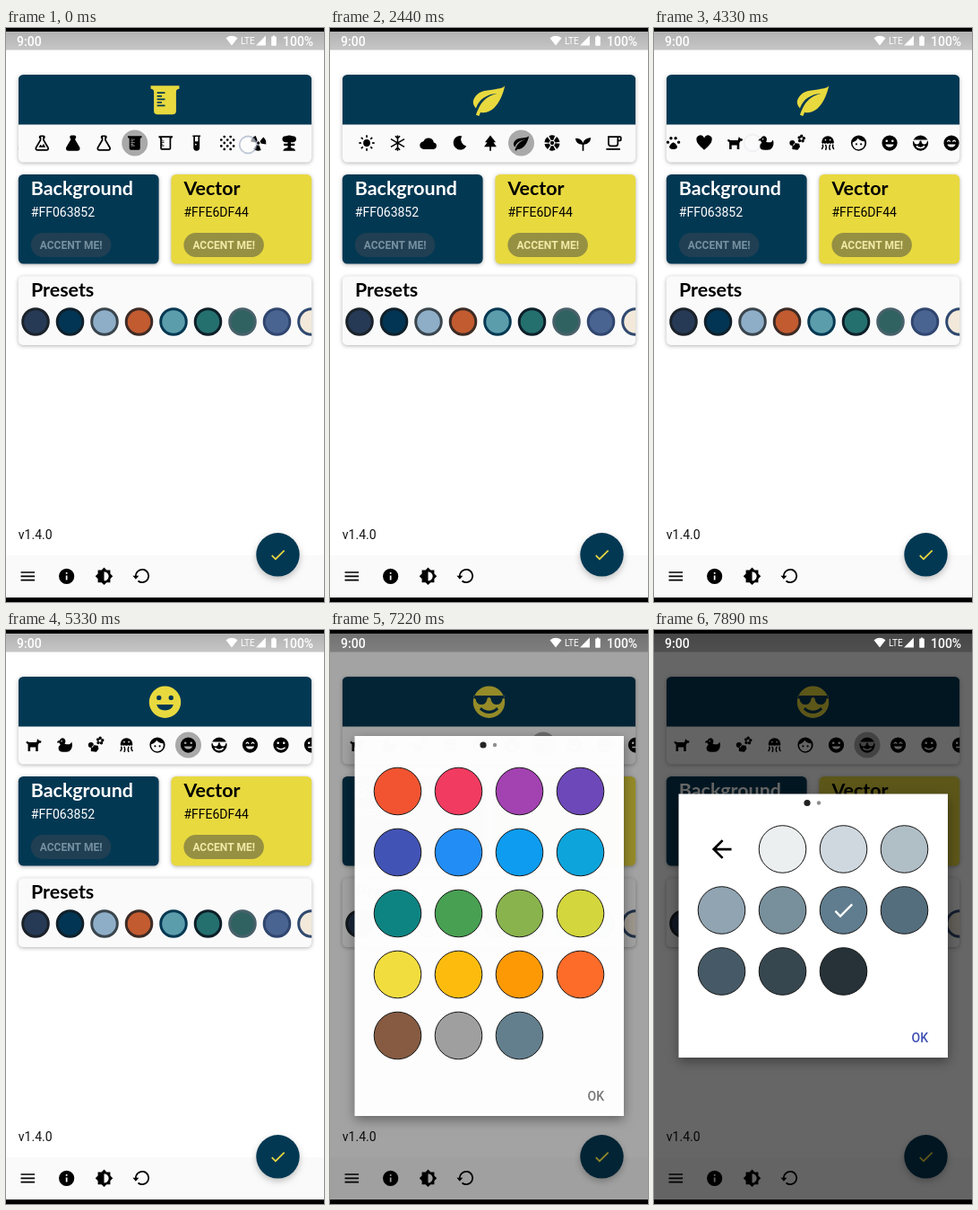
An HTML page with a canvas for the animation above (8 s loop, 355x639 px).

```html
<!DOCTYPE html>
<html lang="en">
<head>
<meta charset="utf-8">
<title>Icon editor</title>
<style>
html, body { margin: 0; width: 100%; height: 100%; overflow: hidden; background: #000; }
canvas { display: block; width: 355px; height: 639px; }
</style>
</head>
<body>
<canvas id="stage"></canvas>
<script>
const W = 355, H = 639, TOP = 4, BOTTOM = 634, LOOP = 8000;
const BLUE = '#033853', YELLOW = '#e8d93f';
const LEFT = 13.8, WIDE = 327.4, HALF = 156.8, ICON = 20.7;
const canvas = document.getElementById('stage');
const ctx = canvas.getContext('2d');
const dpr = window.devicePixelRatio || 1;
canvas.width = W * dpr;
canvas.height = H * dpr;

// Path helpers on a 24-unit grid
const disc = (x, y, r) => `M${x - r} ${y}a${r} ${r} 0 1 0 ${2 * r} 0a${r} ${r} 0 1 0 ${-2 * r} 0z`;
const dots = (r, ...p) => p.map(([x, y]) => disc(x, y, r)).join('');
const polar = (r, a) => `${12 + r * Math.cos(a)} ${12 + r * Math.sin(a)}`;
const fan = (n, r0, r1, half, turn) => Array.from({ length: n }, (_, i) => {
  const a = turn + i * 2 * Math.PI / n;
  return `M${polar(r0, a - half)}L${polar(r1, a - half)}A${r1} ${r1} 0 0 1 ${polar(r1, a + half)}L${polar(r0, a + half)}z`;
}).join('');
const icon = (fill, line, width = 2) => ({
  fill: fill && new Path2D(fill), line: line && new Path2D(line), width
});

const FACE = disc(12, 12, 10);
const EYES = dots(1.5, [8.2, 9.3], [15.8, 9.3]);
const FLASK = 'M6 22a3 3 0 0 1-3-3c0-.6.2-1.2.5-1.7L9 7.8V6a1 1 0 0 1-1-1V4a2 2 0 0 1 2-2h4a2 2 0 0 1 2 2v1a1 1 0 0 1-1 1v1.8l5.5 9.5c.3.5.5 1.1.5 1.7a3 3 0 0 1-3 3z';
const HOLLOW = 'M5 19a1 1 0 0 0 1 1h12a1 1 0 0 0 1-1c0-.2-.1-.4-.2-.6L13 8.4V4h-2v4.4L5.2 18.4c-.1.2-.2.4-.2.6z';
const BEAKER = 'M3 3h18v2a2 2 0 0 0-2 2v12a2 2 0 0 1-2 2H7a2 2 0 0 1-2-2V7a2 2 0 0 0-2-2z';
const CUP = 'M2 21h18v-2H2zM20 8h-2V5h2zM20 3H4v10a4 4 0 0 0 4 4h6a4 4 0 0 0 4-4v-3h2a2 2 0 0 0 2-2V5a2 2 0 0 0-2-2z';
const CUP_HOLE = 'M16 13a2 2 0 0 1-2 2H8a2 2 0 0 1-2-2V5h10z';
const GRIN = 'M6.7 13.6h10.6a5.5 5 0 0 1-10.6 0z';

const icons = {
  flaskLow: icon(FLASK + HOLLOW),
  flaskMark: icon(FLASK + HOLLOW + 'M8 17l2-3 2 2 2-3 2.5 4.5h-9z'),
  flask: icon(FLASK),
  flaskEmpty: icon(FLASK + HOLLOW),
  beaker: icon(BEAKER + [7, 9, 11, 13, 15].map((y, i) => `M7 ${y}h${i % 2 ? 3 : 5}v1H7z`).join('')),
  beakerEmpty: icon(BEAKER + 'M7 5v2h1v1H7v1h3v1H7v1h3v1H7v1h1v1H7v1h3v1H7v3h10V5z'),
  tube: icon('M7 2v2h1v14a4 4 0 0 0 8 0V4h1V2zM10 4h4v6h-4z' + disc(11, 14, 1)),
  grain: icon(dots(1.6, [8, 4], [16, 4], [4, 8], [12, 8], [20, 8], [8, 12], [16, 12], [4, 16], [12, 16], [20, 16], [8, 20], [16, 20])),
  radiation: icon(disc(12, 12, 2) + fan(3, 3.5, 10, .52, -.35)),
  blast: icon('M3 7q0-4 5-4 4-2 8 0 5 0 5 4t-5 4h-2v2h5v2.500h-5V18q5 .5 6 4H4q1-3.500 6-4v-2.500H5V13h5v-2H8q-5 0-5-4z'),
  bowl: icon('M4 8h16l2 3v3l-3 1q-1 5-5 5h-4q-6 0-6-7z'),
  yin: icon(FACE + 'M12 4a4 4 0 0 0 0 8 4 4 0 0 1 0 8 8 8 0 0 1 0-16z' + dots(1.5, [12, 8], [12, 16])),
  pi: icon('', 'M4 8V6h16M8.5 6v13M15.5 6v10q0 3 3.5 2', 2.2),
  alpha: icon('', 'M18 6q-3 12-8 12-4 0-4-6t4-6q5 0 8 12.5', 2.1),
  beta: icon('', 'M8 22V8q0-4 4-4t4 3.5-5 3.5q6 0 6 4t-5 4-4-3', 2.1),
  lambda: icon('', 'M6 5h2q2 0 3 3l4.5 10q.5 1 2.5 1M12 10.5L7 20', 2.1),
  sum: icon('', 'M17.5 8.5V5h-11l6.5 7-6.5 7h11v-3.5', 2.2),
  sigma: icon('', 'M20 5.200H12a6.800 7 0 1 0 0 14 6.800 7 0 0 0 3-13.300', 2.4),
  infinity: icon('', 'M12 12q-3-4-6-4a4 4 0 0 0 0 8q3 0 6-4t6-4a4 4 0 0 1 0 8q-3 0-6-4', 2.2),
  flash: icon('M7 2v11h3v9l7-12h-4l4-8z'),
  drop: icon('M12 3q7 8 6 12a6 6 0 0 1-12 0q-1-4 6-12z'),
  sun: icon(disc(12, 12, 4.5) + fan(8, 7, 10, .12, 0)),
  snow: icon('', 'M12 2v20M3.3 7l17.4 10M3.3 17L20.7 7M9 3l3 3 3-3M9 21l3-3 3 3', 1.8),
  cloud: icon('M6 20a5 5 0 0 1-.6-10 7 7 0 0 1 13.4 1.5A4.3 4.3 0 0 1 18.5 20z'),
  moon: icon('M15 3a9 9 0 1 0 6 13A9 9 0 0 1 15 3z'),
  tree: icon('M12 2l7 9h-3l4 6h-7v5h-2v-5H4l4-6H5z'),
  leaf: icon('M17 8C8 10 5.9 16.2 3.8 21.3L5.7 22l1-2.3c.4.2.9.3 1.3.3C19 20 22 3 22 3c-1 2-8 2.3-13 3.3S2 11.5 2 13.5s1.8 3.7 1.8 3.7C7 8 17 8 17 8z'),
  flower: icon(fan(6, 4, 10, .4, .5) + disc(12, 12, 2.5)),
  sprout: icon('M11 22v-8q-8 0-9-8 8 0 10 6 1-6 10-7 0 8-9 9v8z'),
  coffeeEmpty: icon(CUP + CUP_HOLE),
  tea: icon(CUP + 'M9 5h1v3l2 1v4H7.5V9L9 8z'),
  coffeeMark: icon(CUP + CUP_HOLE + 'M11 6.5q4 4 2 6-2 1.5-4 0-2-2 2-6z'),
  cupcake: icon('M12 1q2 2 1.5 3.5 4 0 4 4 3 .5 3 4h-17q0-3.5 3-4 0-4 4-4Q10 3 12 1zM6 14h2.5l.7 8H8zM10 14h4l-.5 8h-3zM15.5 14H18l-2 8h-1.2z'),
  pizza: icon('M12 2C8.4 2 5.2 3.5 3 6l9 16 9-16c-2.2-2.4-5.4-4-9-4z' + dots(1.8, [9, 7.5], [13, 13])),
  chef: icon('M12 1.5a4.4 4.4 0 0 0-4 2.6A4 4 0 0 0 6 12v5h12v-5a4 4 0 0 0-2-7.9A4.4 4.4 0 0 0 12 1.5zM6 18.5h12V22H6zM8.5 12h1v5h-1zM14.5 12h1v5h-1z'),
  burger: icon('M1 13q0-4 6.5-4t6.5 4zM1 15h13v2H1zM1 19h13v1q0 2-1 2H2q-1 0-1-2zM15 6h3V2l4-1 .3 1.3-2.8.7V6H23l-1.5 16H16z'),
  rice: icon('M2 12h20a10 10 0 0 1-5 8.5V22H7v-1.5A10 10 0 0 1 2 12zM5 11q1-6 7-6t7 6z', 'M13 7l7-5M15 9l7-5', 1.2),
  chili: icon('M8 2h2q0 3 2 4 2 2 2 5 2 4 6 3 3 1 1 4-2 3-7 3-9 0-9-10-2-5 2-6z'),
  bread: icon('M4 21q-4-4 2-10T17 3q5-1 5 3-1 5-8 11T4 21zM9 11l2 3 1-1-2-3zM13 8l2 3 1-1-2-3z'),
  egg: icon('M12 2q6 6 6 12a6 7 0 0 1-12 0q0-6 6-12z'),
  apple: icon('M12 7q4-3 7 0 3 4-1 11-2 4-6 2-4 2-6-2-4-7-1-11 3-3 7 0zM12 6q0-4 4-4 0 4-4 4z'),
  carrot: icon('M3 21L9 8q6-1 7 7zM14 8l1-5 2 4 4-2-1 4 2 1-5 1z'),
  fish: icon('M2 12q6-8 14-2l5-4v12l-5-4q-8 6-14-2z' + disc(7, 11, 1)),
  paw: icon('M12 11q3 1 5 5 1 4-5 4t-5-4q2-4 5-5z' + dots(2, [5, 11], [9, 6], [15, 6], [19, 11])),
  heart: icon('M12 21Q2 13 2 8a5 5 0 0 1 10-2 5 5 0 0 1 10 2q0 5-10 13z'),
  dog: icon('M17 4l-1.5 4.5H6L3 7 2 9l2.5 2V20h3v-5h7v5h3v-8l1.5-2.5H21l1-2.5-3.5-1z'),
  duck: icon('M9 3a4 4 0 0 1 4 4.5q0 2-1 3 3 1 6 .5 2-.5 3-3 2 6-1 10-2 3-6 3h-4q-6 0-6-5 0-2 2.5-4.5Q5 9.5 5 9H2q0-2 3.5-3Q6.5 3 9 3z' + disc(8, 7, .9)),
  bee: icon(disc(6, 12, 3.5) + 'M9 12l6 1 1 4-3 4-7-1 0-4z' + dots(2, [18, 3], [21, 6], [19.5, 9.5], [15.5, 9], [15, 5])),
  jelly: icon('M12 3a8 8 0 0 1 8 8q-1 3-3 1-1 2-3 0-2 2-4 0-2 2-3 0-2 2-3-1a8 8 0 0 1 8-8z' + dots(1, [9, 8], [15, 8]), 'M5 14q2 3-1 6M9 14q2 4 0 7M15 14q-2 4 0 7M19 14q-2 3 1 6', 1.6),
  child: icon(FACE + 'M4 11q5-1 7-5 3 4 8.5 4a8 8 0 1 1-15.5 1z' + dots(1.3, [9, 13.5], [15, 13.5])),
  happy: icon(FACE + EYES + GRIN),
  cool: icon(FACE + 'M2.4 8h19.2v1.5l-1.2.5a3.6 3.6 0 0 1-7.2 0l-.5-.8h-1.4l-.5.8a3.6 3.6 0 0 1-7.2 0l-1.2-.5zM7.2 15.3a6.5 6.5 0 0 0 9.6 0l1.2 1.2a8 8 0 0 1-12 0z'),
  laugh: icon(FACE + GRIN + 'M6 10q2.5-4 5 0l-1 .8q-1.5-2-3 0zM13 10q2.5-4 5 0l-1 .8q-1.5-2-3 0z'),
  smile: icon(FACE + EYES + 'M7 14.5q5 4 10 0l1 1.2q-6 5.5-12 0z'),
  wink: icon(FACE + EYES + 'M7 14h10v1.8H7z')
};
const strip = Object.entries(icons);

const ui = {
  menu: icon('M3 6h18v2H3zM3 11h18v2H3zM3 16h18v2H3z'),
  info: icon(FACE + 'M11 7h2v2h-2zM11 11h2v6h-2z'),
  bright: icon('M12 18V6a6 6 0 0 1 0 12zM20 15.3L23.3 12 20 8.7V4h-4.7L12 .7 8.7 4H4v4.7L.7 12 4 15.3V20h4.7l3.3 3.3 3.3-3.3H20z'),
  restore: icon('M.5 11.5h8l-4 4.5z', 'M4.5 12a8.3 8.3 0 1 1 3 6', 2),
  check: icon('M21 7L9 19l-5.5-5.5 1.4-1.4L9 16.2 19.6 5.6z'),
  back: icon('M20 11v2H8l5.5 5.5-1.4 1.4L4.2 12l7.9-7.9 1.4 1.4L8 11z'),
  wifi: icon('M12 22L24 7Q12-2 0 7z'),
  signal: icon('M2 22h20V2z'),
  battery: icon('M16 4h-2V2h-4v2H8q-1 0-1 1v16q0 1 1 1h8q1 0 1-1V5q0-1-1-1z')
};

const presets = [
  ['#263a56', '#1b2229'], ['#023553', '#10202b'], ['#8eaec8', '#3a454c'],
  ['#c25b30', '#3d2b25'], ['#5c9dac', '#063852'], ['#24706f', '#0e2029'],
  ['#306261', '#48616a'], ['#4a6491', '#30466f'], ['#f2e9da', '#30496f']
];
const palette = ['#f2522f', '#f2385f', '#a23fb0', '#6b46b8', '#3f51b5', '#1f8cf5', '#0a9bf0',
  '#0aa3dc', '#0b8380', '#469f50', '#88b24b', '#d3d639', '#f2dd3c', '#fdbb0a', '#fe9803',
  '#fe6a26', '#85593f', '#9e9e9e', '#617d8d'];
const shades = ['', '#eceff0', '#cfd8df', '#b0bec6', '#90a4b2', '#78909c', '#607d8f',
  '#546e7e', '#455a66', '#374750', '#263238'];

// Scroll keys: time, offset, eased
const scrollKeys = [
  [0, 0], [220, 170], [780, 338, 1], [1220, 338], [1440, 505], [2000, 690, 1],
  [2500, 690], [2720, 850], [3200, 925, 1], [3330, 925], [3440, 991.5], [3560, 1076],
  [4000, 1260, 1], [4050, 1260], [4250, 1420], [4700, 1528, 1], [LOOP, 1528]
];
// Touches: start, end, from x, y, to x, y
const touches = [
  [0, 220, 271, 130, 101, 128], [790, 910, 255, 128, 255, 128],
  [1200, 1220, 227, 114, 227, 114], [1220, 1440, 227, 114, 60, 124],
  [2110, 2250, 213, 128, 213, 128], [2500, 2720, 270, 128, 110, 128],
  [3330, 3560, 302, 128, 163, 128], [4050, 4250, 270, 128, 110, 128],
  [4980, 5170, 204, 128, 204, 128], [6170, 6400, 238, 128, 238, 128],
  [6770, 6950, 140, 193, 140, 193], [7460, 7620, 211, 451, 211, 451]
];
const picks = [[0, 'beaker'], [890, 'sigma'], [2220, 'leaf'], [5100, 'happy'], [6330, 'cool']];

const ramp = (t, a, b) => Math.min(1, Math.max(0, (t - a) / (b - a)));

function scrollAt(t) {
  const i = scrollKeys.findIndex(k => k[0] > t);
  const [t0, s0] = scrollKeys[i - 1], [t1, s1, ease] = scrollKeys[i];
  const p = ramp(t, t0, t1);
  return s0 + (s1 - s0) * (ease ? 1 - (1 - p) ** 3 : p);
}

function drawIcon(ic, x, y, size, color) {
  ctx.save();
  ctx.translate(x - size / 2, y - size / 2);
  ctx.scale(size / 24, size / 24);
  ctx.fillStyle = ctx.strokeStyle = color;
  if (ic.fill) ctx.fill(ic.fill, 'evenodd');
  if (ic.line) {
    ctx.lineWidth = ic.width;
    ctx.stroke(ic.line);
  }
  ctx.restore();
}

function circle(x, y, r, fill, stroke, width = 1) {
  ctx.beginPath();
  ctx.arc(x, y, r, 0, 7);
  ctx.fillStyle = fill;
  ctx.fill();
  if (stroke) {
    ctx.strokeStyle = stroke;
    ctx.lineWidth = width;
    ctx.stroke();
  }
}

function rect(x, y, w, h, fill) {
  ctx.fillStyle = fill;
  ctx.fillRect(x, y, w, h);
}

function round(x, y, w, h, r, fill) {
  ctx.beginPath();
  ctx.roundRect(x, y, w, h, r);
  ctx.fillStyle = fill;
  ctx.fill();
}

function shadowed(blur, dy, alpha, draw) {
  ctx.save();
  ctx.shadowColor = `rgba(0,0,0,${alpha})`;
  ctx.shadowBlur = blur * dpr;
  ctx.shadowOffsetY = dy * dpr;
  draw();
  ctx.restore();
}

const card = (x, y, w, h, fill) => shadowed(4, 1, .3, () => round(x, y, w, h, 5.5, fill));

function text(str, x, y, font, color) {
  ctx.font = font;
  ctx.fillStyle = color;
  ctx.fillText(str, x, y);
}
const roboto = (size, weight = 400) => `${weight} ${size}px Roboto, sans-serif`;
const title = (str, x, y, color) => text(str, x, y, '700 21.4px Lato, sans-serif', color);

function inCard(y, h, draw) {
  ctx.save();
  ctx.beginPath();
  ctx.roundRect(LEFT, y, WIDE, h, 5.5);
  ctx.clip();
  draw();
  ctx.restore();
}

function colorCard(x, name, hex, fill, ink, pill, label) {
  card(x, 162.9, HALF, 99.6, fill);
  title(name, x + 14, 186, ink);
  text(hex, x + 14, 210, roboto(14), ink);
  round(x + 14, 228, 89.5, 27, 13.5, pill);
  text('ACCENT ME!', x + 24, 246, roboto(12, 700), label);
}

function drawApp(t) {
  rect(0, 0, W, H, '#fff');
  const [, picked] = picks.filter(p => p[0] <= t).pop();
  const offset = scrollAt(t);

  card(LEFT, 52, WIDE, 97.5, '#fafafa');
  inCard(52, 97.5, () => {
    rect(LEFT, 52, WIDE, 55.5, BLUE);
    drawIcon(icons[picked], 177.5, 80.2, 42.5, YELLOW);
    strip.forEach(([name, ic], i) => {
      const x = 6.5 + 34.5 * i - offset;
      if (x < -10 || x > W + 10) return;
      if (name === picked) circle(x, 128, 14.5, '#a9a9a9');
      drawIcon(ic, x, 128, ICON, '#000');
    });
  });

  colorCard(LEFT, 'Background', '#FF063852', BLUE, '#fff', '#203f53', '#7590a1');
  colorCard(184.4, 'Vector', '#FFE6DF44', YELLOW, '#000', '#969042', '#f0eaa8');

  card(LEFT, 276.2, WIDE, 76.8, '#fafafa');
  title('Presets', 28, 299, '#000');
  inCard(276.2, 76.8, () => presets.forEach(([fill, ring], i) =>
    circle(33 + 38.5 * i, 327, 14.3, fill, ring, 3)));

  text('v1.4.0', LEFT, 568.5, roboto(14), '#111');
  rect(0, 587, W, 48, '#fafafa');
  ['menu', 'info', 'bright', 'restore'].forEach((name, i) =>
    drawIcon(ui[name], 24.3 + i * 42.6 + (i ? 1.500 : 0) * (1 - i / 2), 610.3, ICON, '#000'));
  shadowed(7, 3, .24, () => circle(303.5, 586.3, 24.2, BLUE));
  drawIcon(ui.check, 303.5, 586.5, ICON, YELLOW);

  const bar = ctx.createLinearGradient(0, TOP, 0, 24.5);
  bar.addColorStop(0, '#b2b2b2');
  bar.addColorStop(1, '#c6c6c6');
  rect(0, TOP, W, 20.5, bar);
}

function drawStatus() {
  rect(0, 0, W, TOP, '#000');
  rect(0, BOTTOM, W, H - BOTTOM, '#000');
  text('9:00', 12, 19.5, roboto(14, 500), '#fff');
  drawIcon(ui.wifi, 252, 14, 13, '#fff');
  text('LTE', 262, 18, roboto(10), '#fff');
  drawIcon(ui.signal, 284.5, 14, 13, '#fff');
  drawIcon(ui.battery, 299, 14, 13.5, '#fff');
  text('100%', 309, 19.5, roboto(14, 500), '#fff');
}

function drawDialog(t) {
  const second = t >= 7720;
  const top = second ? 182.5 : 118;
  const bottom = second ? 476 : 541;
  ctx.save();
  ctx.globalAlpha = ramp(t, 6950, 7225);
  shadowed(12, 4, .4, () => rect(27.5, top, 300.5, bottom - top, '#fff'));
  circle(171, top + 10, 3.6, '#212121');
  circle(184, top + 10, 2.2, '#8d8d8d');
  (second ? shades : palette).forEach((color, i) => {
    const x = 75.5 + i % 4 * 68, y = top + 61.5 + Math.floor(i / 4) * 68;
    if (color) circle(x, y, 26.3, color, '#111');
    else drawIcon(ui.back, x, y, 33, '#000');
    if (second && i === 6) drawIcon(ui.check, x, y, 28, '#fff');
  });
  text('OK', 287.5, bottom - 17, roboto(14, 500), second ? '#3f51b5' : '#757575');
  ctx.restore();
}

function drawTouch(t) {
  // Only the latest touch shows
  const touch = touches.filter(p => p[0] <= t).pop();
  const [a, b, x0, y0, x1, y1] = touch;
  if (t > b + 100) return;
  const p = ramp(t, a, b);
  ctx.save();
  ctx.globalAlpha = 1 - ramp(t, b, b + 100);
  circle(x0 + (x1 - x0) * p, y0 + (y1 - y0) * p, 9.5, 'rgba(255,255,255,.6)', 'rgba(125,140,175,.45)', 1.8);
  ctx.restore();
}

function draw(t) {
  ctx.setTransform(dpr, 0, 0, dpr, 0, 0);
  drawApp(t);
  const dim = .6 * ramp(t, 6950, 7400);
  if (dim) rect(0, TOP, W, BOTTOM - TOP, `rgba(0,0,0,${dim})`);
  drawStatus();
  if (t > 6950) drawDialog(t);
  drawTouch(t);
}

const start = performance.now();
function tick() {
  draw((performance.now() - start) % LOOP);
  requestAnimationFrame(tick);
}
tick();
</script>
</body>
</html>
```
